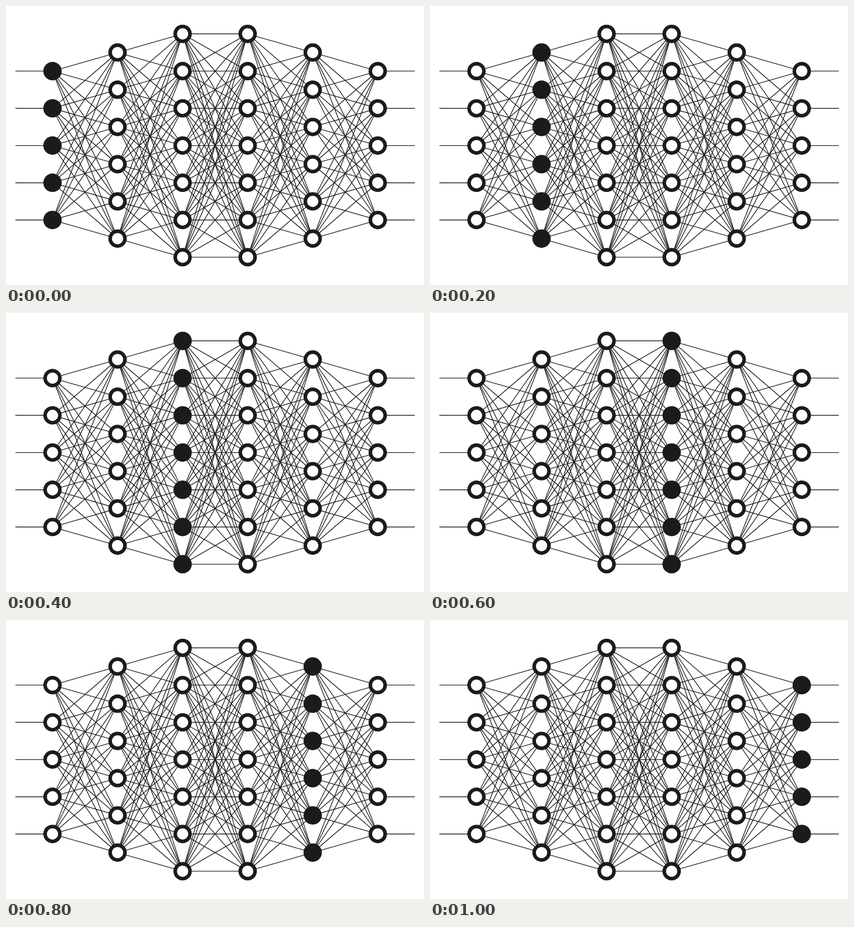
Write an HTML page with a canvas that moves like this. It is 800 px wide and 533 px high and loops after 1200 ms.

```html
<!DOCTYPE html>
<html lang="en">
<head>
<meta charset="utf-8">
<title>Neural network</title>
<style>
  html, body { margin: 0; width: 100%; height: 100%; overflow: hidden; background: #fff; }
  canvas { display: block; }
</style>
</head>
<body>
<canvas id="stage" width="800" height="533"></canvas>
<script>
const ctx = document.getElementById('stage').getContext('2d');
const INK = '#1b1b1b', STEP = 200, DX = 124.5, DY = 71.1, LEAD = 71;

const layers = [5, 6, 7, 7, 6, 5].map((count, col) =>
  Array.from({ length: count }, (_, row) => ({
    x: 89 + col * DX,
    y: 266.6 + (row - (count - 1) / 2) * DY
  })));

function line(x1, y1, x2, y2) {
  ctx.beginPath();
  ctx.moveTo(x1, y1);
  ctx.lineTo(x2, y2);
  ctx.stroke();
}

function disc({ x, y }, radius, fill) {
  ctx.fillStyle = fill;
  ctx.beginPath();
  ctx.arc(x, y, radius, 0, Math.PI * 2);
  ctx.fill();
}

function draw(active) {
  ctx.fillStyle = '#fff';
  ctx.fillRect(0, 0, 800, 533);
  ctx.strokeStyle = INK;
  ctx.lineWidth = 1.4;

  for (const { x, y } of layers[0]) line(x - LEAD, y, x, y);
  for (const { x, y } of layers[5]) line(x, y, x + LEAD, y);
  for (let i = 0; i < 5; i++)
    for (const a of layers[i])
      for (const b of layers[i + 1]) line(a.x, a.y, b.x, b.y);

  layers.forEach((layer, i) => {
    for (const node of layer) {
      disc(node, 17.6, INK);
      if (i !== active) disc(node, 10.7, '#fff');
    }
  });
}

const start = performance.now();
function tick() {
  const time = performance.now() - start;
  draw(Math.floor(time / STEP) % layers.length);
  requestAnimationFrame(tick);
}
tick();
</script>
</body>
</html>
```
